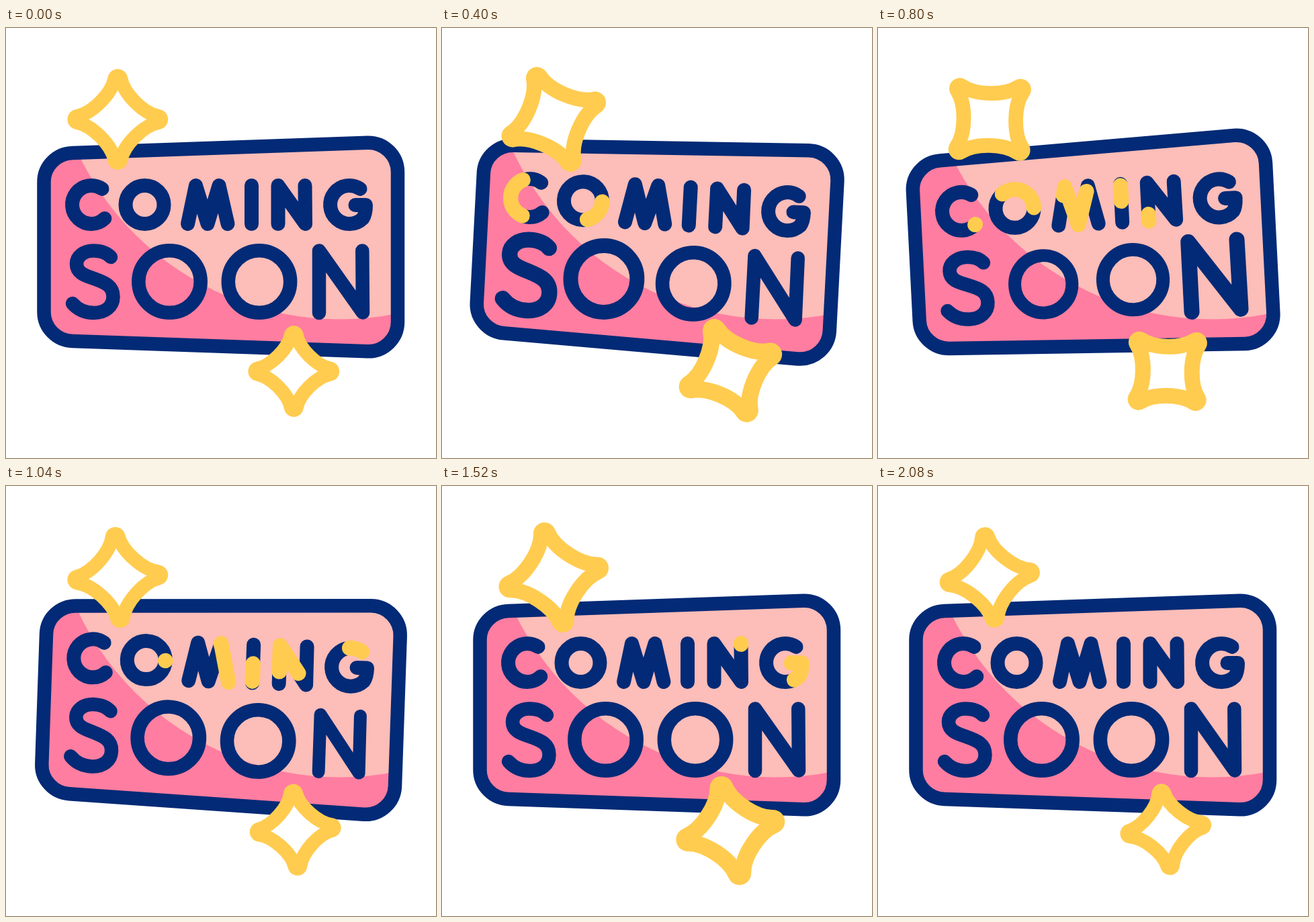
An HTML page with a canvas for the animation above (2.12 s loop, 640 px wide and 640 px high).

```html
<!DOCTYPE html>
<html lang="en">
<head>
<meta charset="utf-8">
<title>Coming soon</title>
<style>
  html, body { margin: 0; width: 100%; height: 100%; overflow: hidden; background: #fff; }
  canvas { display: block; width: 100vw; height: 100vh; }
</style>
</head>
<body>
<canvas id="stage" aria-label="Coming soon"></canvas>
<script>
const LOOP = 2120, SIZE = 640;
const NAVY = '#032a76', YELLOW = '#ffcc50', LIGHT = '#fdbdb8', PINK = '#ff7da0';

const canvas = document.getElementById('stage');
const ctx = canvas.getContext('2d');
const ratio = window.devicePixelRatio || 1;
canvas.width = canvas.height = SIZE * ratio;

const ease = p => (1 - Math.cos(Math.PI * Math.min(1, Math.max(0, p)))) / 2;

// Eased value through [time, value] keys
function track(keys, t) {
  if (t <= keys[0][0]) return keys[0][1];
  for (let i = 1; i < keys.length; i++) {
    const [t0, v0] = keys[i - 1], [t1, v1] = keys[i];
    if (t < t1) return v0 + (v1 - v0) * ease((t - t0) / (t1 - t0));
  }
  return keys[keys.length - 1][1];
}

function pathLength(d) {
  const el = document.createElementNS('http://www.w3.org/2000/svg', 'path');
  el.setAttribute('d', d);
  return el.getTotalLength();
}

const ring = (x, y, r) =>
  `M${x + r} ${y}a${r} ${r} 0 1 1 ${-2 * r} 0a${r} ${r} 0 1 1 ${2 * r} 0`;

const sign = new Path2D('M56.5 229C56.5 205.5 75.5 186.7 99 186L538 170.7' +
  'C562.8 170 583 190 583 214.5V437.5C583 462 562.8 482 538 481.3' +
  'L99 466C75.5 465.3 56.5 446 56.5 423Z');

// Upper word: outline and the delay of its running highlight
const upper = [
  ['M143 239.4A28.5 28.5 0 1 0 146.8 283.5', 0],
  [ring(206.5, 263, 28.5), 220],
  ['M270.5 291.5L282.5 234.5L300 291.5L317 234.5L330 291.5', 415],
  ['M365.5 234.5V291.5', 520],
  ['M405 291.5V234.5L445.5 291.5L445 234.5', 710],
  ['M527 239.4A28.5 28.5 0 1 0 531.2 283.2Q535.5 277 535.5 263.5H520', 905]
].map(([d, delay]) => ({ path: new Path2D(d), length: pathLength(d), delay }));

// Lower word: outline and centre x; letters pulse one after another
const lower = [
  ['M156 341C149 333.5 139 331.5 130 331.5C116 331.5 105 340 105 351' +
   'C105 364 116 368 131 373C148 379 159.5 384 159.5 400' +
   'C159.5 415 147 424 131 424C116 424 106 418 99 410', 130],
  [ring(243.5, 377.5, 46.2), 243.5],
  [ring(377, 377.5, 46.2), 377],
  ['M466 424V331.5L531 423.5L530.3 331.5', 498.5]
].map(([d, cx], i) => ({ path: new Path2D(d), cx, delay: 120 * i }));

const tilt = [[0, 0], [390, 3], [770, -3], [1140, 3], [1500, 0]];
const pulse = [[160, 1], [400, 1.14], [640, 0.91], [800, 1]];
const swell = [[0, 0], [530, 1], [1080, 0], [1620, 1], [2120, 0]];

function starPath(k) {
  const path = new Path2D();
  const at = (i, x, y) => {
    const c = [1, 0, -1, 0][i], s = [0, 1, 0, -1][i];
    return [k * (x * c - y * s), k * (x * s + y * c)];
  };
  path.moveTo(...at(0, -4.6, -61));
  for (let i = 0; i < 4; i++) {
    path.bezierCurveTo(...at(i, -3.4, -66), ...at(i, 3.4, -66), ...at(i, 4.6, -61));
    path.bezierCurveTo(...at(i, 9, -38), ...at(i, 38, -9), ...at(i, 61, -4.6));
  }
  path.closePath();
  return path;
}

const stars = [
  { path: starPath(1), x: 166.3, y: 136, dx: 0, dy: 0, grow: 0.12 },
  { path: starPath(0.892), x: 429.5, y: 511.4, dx: -1.2, dy: -0.4, grow: 0.23 }
];

function stroke(path, color, width) {
  ctx.strokeStyle = color;
  ctx.lineWidth = width;
  ctx.stroke(path);
}

function turnSign(t) {
  ctx.translate(320, 326);
  ctx.rotate(track(tilt, t) * Math.PI / 180);
  ctx.translate(-320, -326);
}

function drawBoard(t) {
  // The light disc stays still while the board turns over it
  ctx.save();
  ctx.save();
  turnSign(t);
  ctx.fillStyle = PINK;
  ctx.fill(sign);
  const m = ctx.getTransform();
  ctx.restore();
  const area = new Path2D();
  const base = new DOMMatrix([ratio, 0, 0, ratio, 0, 0]);
  area.addPath(sign, base.inverse().multiply(m));
  ctx.clip(area);
  ctx.fillStyle = LIGHT;
  ctx.beginPath();
  ctx.arc(497, 2.5, 431, 0, 2 * Math.PI);
  ctx.fill();
  ctx.restore();
}

function drawHighlight(letter, t) {
  const local = t - letter.delay;
  const from = letter.length * ease((local - 200) / 640);
  const to = letter.length * ease(local / 600);
  if (to - from < 0.001) return;
  ctx.setLineDash([to - from, letter.length * 2]);
  ctx.lineDashOffset = -from;
  stroke(letter.path, YELLOW, 22.5);
  ctx.setLineDash([]);
}

function drawWords(t) {
  for (const l of upper) stroke(l.path, NAVY, 21);
  for (const l of upper) drawHighlight(l, t);
  for (const l of lower) {
    const s = track(pulse, t - l.delay);
    ctx.save();
    ctx.translate(l.cx, 377.5);
    ctx.scale(s, s);
    ctx.translate(-l.cx, -377.5);
    stroke(l.path, NAVY, 20.5);
    ctx.restore();
  }
}

function drawStar(star, t) {
  const s = 1 + star.grow * track(swell, t);
  ctx.save();
  ctx.translate(star.x, star.y);
  ctx.rotate(2 * Math.PI * t / LOOP);
  ctx.scale(s, s);
  ctx.translate(star.dx, star.dy);
  ctx.fillStyle = '#fff';
  ctx.fill(star.path);
  stroke(star.path, YELLOW, 20.5);
  ctx.restore();
}

function draw(now) {
  const t = now % LOOP;
  ctx.setTransform(ratio, 0, 0, ratio, 0, 0);
  ctx.fillStyle = '#fff';
  ctx.fillRect(0, 0, SIZE, SIZE);
  ctx.lineCap = ctx.lineJoin = 'round';
  drawBoard(t);
  ctx.save();
  turnSign(t);
  stroke(sign, NAVY, 20.5);
  drawWords(t);
  ctx.restore();
  for (const star of stars) drawStar(star, t);
}

let origin = null;
function tick(now) {
  if (origin === null) origin = now;
  draw(Math.max(0, now - origin));
  requestAnimationFrame(tick);
}
draw(0);
requestAnimationFrame(tick);
</script>
</body>
</html>
```
